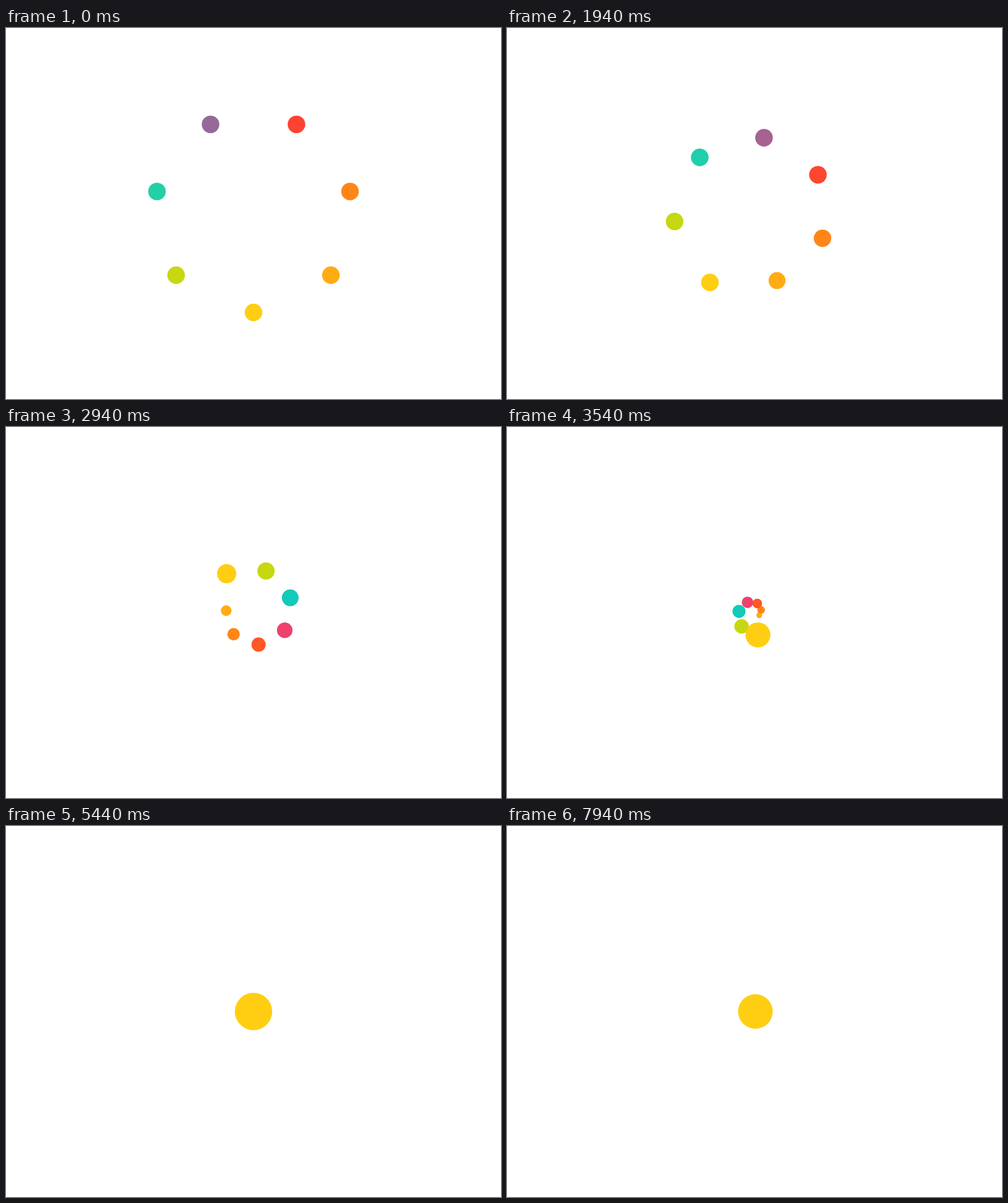
Recreate the animation shown at these times as an HTML page with a canvas. Size 800 by 600 pixels, loop 8 s.

```html
<!DOCTYPE html>
<html lang="en">
<head>
<meta charset="utf-8">
<title>Spiralling dots</title>
<style>
  html, body { margin: 0; width: 100%; height: 100%; overflow: hidden; background: #fff; }
  canvas { display: block; }
</style>
</head>
<body>
<canvas id="stage" width="800" height="600"></canvas>
<script>
const ctx = document.getElementById('stage').getContext('2d');
const LOOP = 8000, START = 508, RING = 160, DOT = 14.2, FULL = 30.2;

// First colour and, where it shifts, the colour near the centre. The last dot stays.
const COLORS = [
  ['#ffac12'], ['#ff8616'], ['#ff4232', '#ff5822'], ['#966a98', '#ee426e'],
  ['#24cfa8', '#12cabb'], ['#c6d812'], ['#ffce12']
];
const LAST = COLORS.length - 1;

const clamp = v => Math.min(1, Math.max(0, v));
const mix = (a, b, k) => a + (b - a) * k;
const smooth = v => { v = clamp(v); return v * v * (3 - 2 * v); };

// Same as cubic-bezier(a, 0, b, 1), solved by bisection.
function ease(x, a, b) {
  x = clamp(x);
  let lo = 0, hi = 1;
  for (let n = 0; n < 30; n++) {
    const s = (lo + hi) / 2, q = 1 - s;
    if (3 * s * q * q * a + 3 * s * s * q * b + s * s * s < x) lo = s;
    else hi = s;
  }
  return smooth(lo);
}

function disc(x, y, r, color, alpha = 1) {
  ctx.globalAlpha = alpha;
  ctx.fillStyle = color;
  ctx.beginPath();
  ctx.arc(x, y, r, 0, 2 * Math.PI);
  ctx.fill();
}

function draw(t) {
  ctx.clearRect(0, 0, 800, 600);
  const turn = 4 * Math.PI * ease((t - START) / 6100, 0.756, 0.244);
  const tint = clamp(t / 2940) ** 4;
  const leave = clamp((t - 7100) / 840) ** 2;

  COLORS.forEach(([color, late], i) => {
    // Each dot falls inwards a little slower than the one before it.
    const k = i / LAST;
    const time = mix(3440, 4215, k ** 1.25);
    const pull = ease((t - START) / time, mix(0.445, 0.52, k), mix(0.727, 0.65, k));
    const dist = RING * (1 - pull);
    const angle = turn + Math.PI / 2 - (i + 1) * 2 * Math.PI / COLORS.length;
    const size = i < LAST
      ? DOT * (1 - smooth((t - 1558 - 225 * i) / 3236))
      : mix(DOT, FULL, smooth((t - 2500) / 2500)) - 2.2 * leave;
    const x = 400 + dist * Math.cos(angle) + 1.5 * leave;
    const y = 300 + dist * Math.sin(angle);
    disc(x, y, size, color);
    if (late) disc(x, y, size, late, tint);
  });
}

// The picture advances every 100 ms, after a first hold of 140 ms.
const step = t => t < 140 ? 0 : Math.floor((t - 40) / 100) * 100 + 40;

let begin;
function tick(now) {
  begin ??= now;
  draw(step((now - begin) % LOOP));
  requestAnimationFrame(tick);
}
draw(0);
requestAnimationFrame(tick);
</script>
</body>
</html>
```
